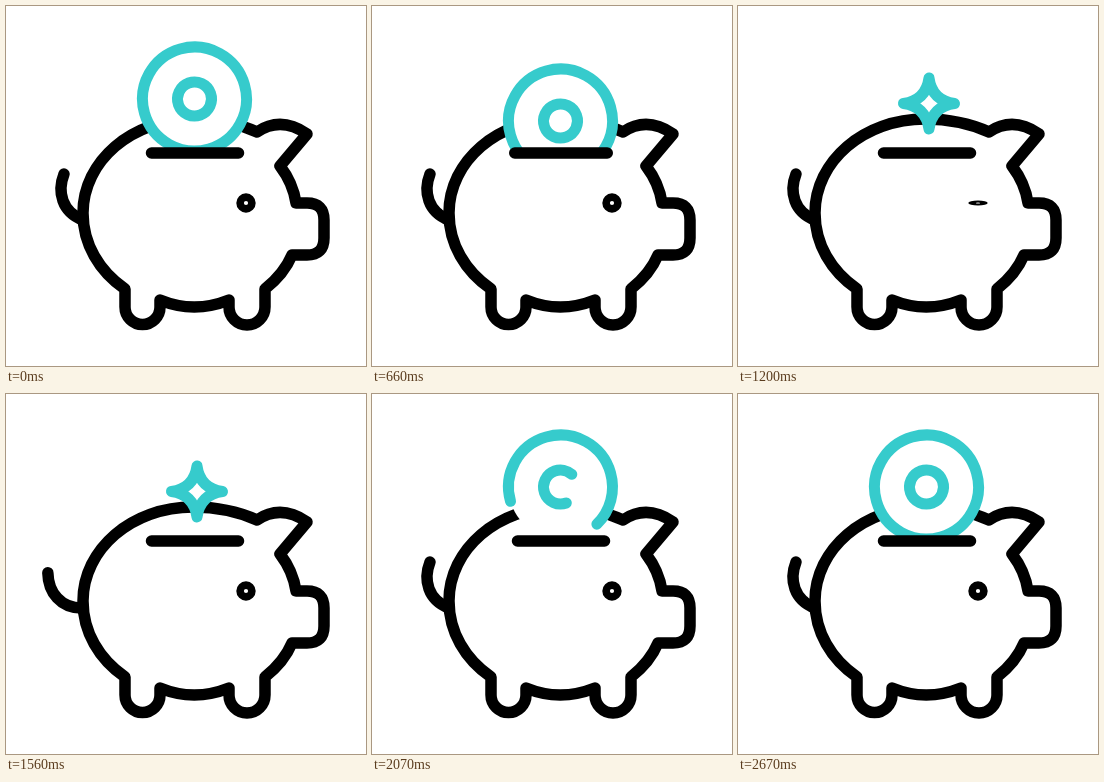
These frames come from a looping animation (360 by 360 pixels, 2700 ms). An HTML page:

```html
<!DOCTYPE html>
<html lang="en">
<head>
<meta charset="utf-8">
<title>Piggy bank</title>
<style>
  html, body { margin: 0; width: 100%; height: 100%; overflow: hidden; background: #fff; }
  svg { display: block; width: 100vw; height: 100vh; }
  .line { fill: none; stroke: #000; stroke-width: 11.5; stroke-linecap: round; stroke-linejoin: round; }
  .teal { stroke: #36cbcc; stroke-width: 11; }
  .white { fill: #fff; }
</style>
</head>
<body>
<svg viewBox="0 0 360 360">
  <clipPath id="above"><rect width="360" height="147"/></clipPath>
  <path id="tail" class="line" d="M58 168C51 186 56 206 77 214"/>
  <path id="body" class="line white"/>
  <g clip-path="url(#above)">
    <g id="coin">
      <circle class="white" r="52"/>
      <circle id="rim" class="line teal" r="52" pathLength="100" transform="rotate(164)"/>
      <circle id="hub" class="line teal" r="17" pathLength="100" transform="rotate(70)"/>
    </g>
  </g>
  <path id="slot" class="line"/>
  <g id="eye"><circle class="line" r="5.9" style="stroke-width:7.6"/></g>
  <path id="spark" class="line teal white"
    d="M0-25.5Q3-3 25.5 0Q3 3 0 25.5Q-3 3-25.5 0Q-3-3 0-25.5Z"/>
</svg>
<script>
const LOOP = 2700, STEP = 30;
const $ = id => document.getElementById(id);
const [tail, body, coin, rim, hub, slot, eye, spark] =
  ['tail', 'body', 'coin', 'rim', 'hub', 'slot', 'eye', 'spark'].map($);

const calm = 'M251 126C231 117 209 113 187 113C126 113 77 155 77 207C77 238 93 265 119 283' +
  'V301A17.5 17.5 0 0 0 154 301V294Q188 308 223 294V301A18 18 0 0 0 259 301V283' +
  'Q278 268 286 249H301Q318 249 318 232V214Q318 197 301 197H290Q287 177 274 160L301 128Q275 110 251 126Z';
const squat = 'M251 126C231 117 212 113 190 113C130 113 84 152 84 203C84 232 97 257 119 270' +
  'V291A17.5 17.5 0 0 0 154 291V284Q188 298 223 284V291A18 18 0 0 0 259 291V275' +
  'Q274 266 280 250H297Q314 250 314 232V214Q314 197 297 197H286Q282 177 269 160L297 128Q275 111 251 126Z';
const squatNums = squat.match(/[\d.]+/g).map(Number);

const mix = (a, b, k) => a + (b - a) * k;
const span = (t, a, b) => Math.min(1, Math.max(0, (t - a) / (b - a)));
const ease = (t, a, b) => (1 - Math.cos(Math.PI * span(t, a, b))) / 2;
const pulse = (t, a, b) => Math.sin(Math.PI * span(t, a, b)) ** 2;

// Arc flags are equal in both poses and must stay plain integers.
function bodyPath(k) {
  let i = 0;
  return calm.replace(/[\d.]+/g, n => +mix(+n, squatNums[i++], k).toFixed(2));
}

function drawRing(ring, k) {
  ring.setAttribute('stroke-dasharray', k < 1 ? `${k * 100} 200` : 'none');
}

function draw(t) {
  const squash = pulse(t, 660, 930) / 0.75;
  body.setAttribute('d', bodyPath(squash));

  const wag = 30 * (pulse(t, 660, 1200) + pulse(t, 1200, 1740));
  tail.setAttribute('transform',
    `translate(${5.5 * squash} ${-2.5 * squash}) rotate(${-wag} 77 214)`);

  const half = 43.5 + 11 * pulse(t, 570, 1110);
  slot.setAttribute('d', `M${189 - half} 147H${189 + half}`);

  const blink = 1 - 0.75 * pulse(t, 1080, 1320);
  eye.setAttribute('transform',
    `translate(${240 - 2 * squash} ${197 - 3 * squash}) scale(1 ${blink})`);

  // The coin drops through the slot, then is drawn again above it.
  const fall = t < 930 ? 87 * (Math.max(0, t - 450) / 390) ** 2.22 : 0;
  const drawn = t < 930 ? 1 : ease(t, 1740, 2280);
  coin.setAttribute('transform', `translate(188.5 ${93 + fall})`);
  coin.setAttribute('visibility', drawn > 0 ? 'visible' : 'hidden');
  drawRing(rim, drawn);
  drawRing(hub, drawn);

  const size = ease(t, 930, 1200) - ease(t, 1560, 1740);
  spark.setAttribute('transform', `translate(191 97.5) scale(${size})`);
  spark.setAttribute('visibility', size > 0.001 ? 'visible' : 'hidden');
}

function tick() {
  const t = performance.now() % LOOP;
  draw(Math.floor(t / STEP) * STEP);
  requestAnimationFrame(tick);
}
tick();
</script>
</body>
</html>
```
